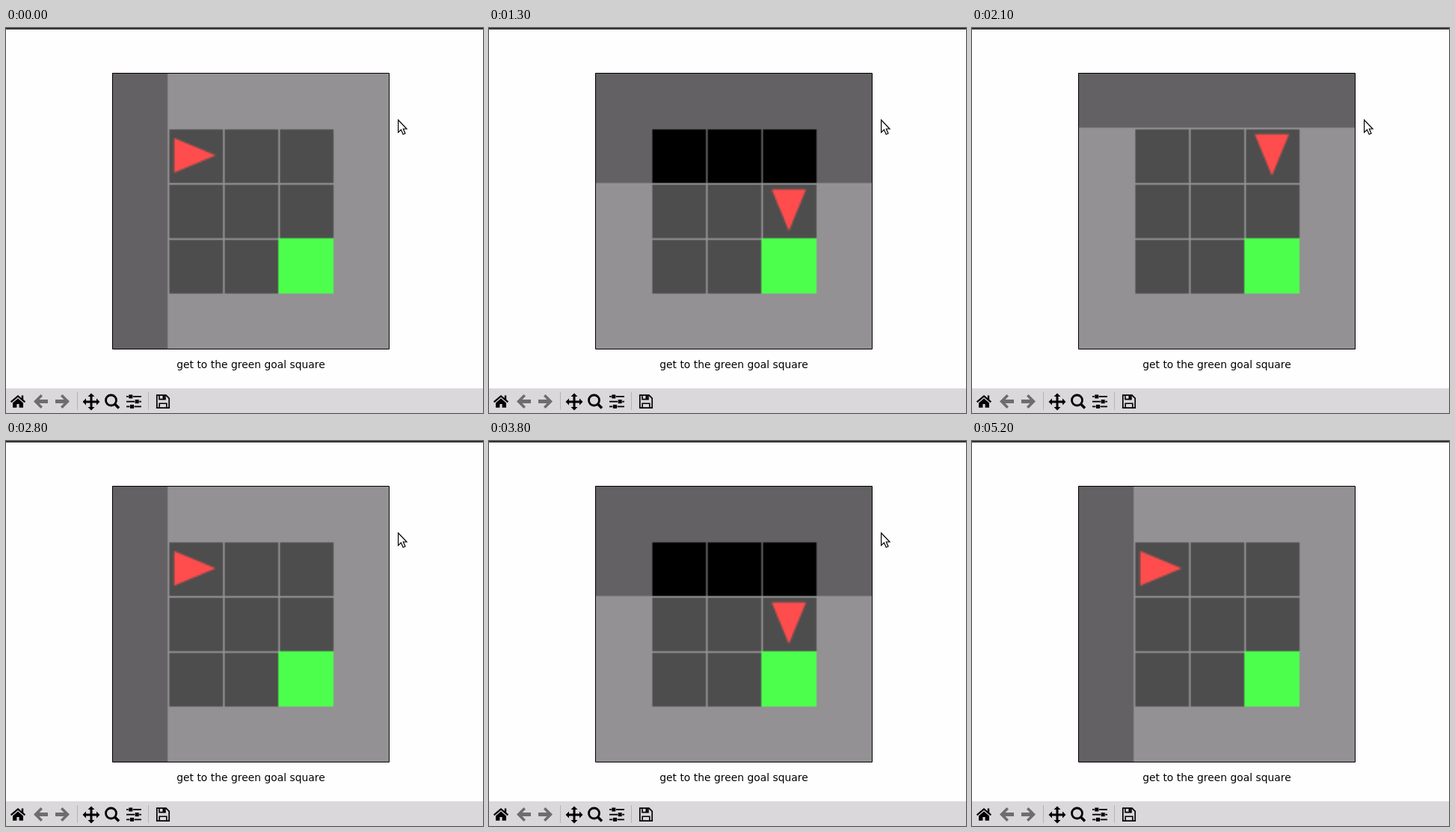
Write an HTML page with a canvas that moves like this. It is 638x515 px and loops after 5.6 s.

```html
<!DOCTYPE html>
<html lang="en">
<head>
<meta charset="utf-8">
<title>Grid world</title>
<style>
html, body { margin: 0; width: 100%; height: 100%; overflow: hidden; background: #fefefe; }
canvas { display: block; }
</style>
</head>
<body>
<canvas id="stage" width="638" height="515"></canvas>
<script>
const LOOP = 5600, TILE = 32, WORLD = 5 * TILE;
const stage = document.getElementById('stage').getContext('2d');
const world = newContext(WORLD);

// Start of each run, then the times of its actions: right, right, turn, forward
const runs = [
  [0, 400, 500, 800, 1300],
  [1500, 1800, 1800, 2100, 2500],
  [2800, 3100, 3300, 3500, 3800],
  [4500]
];

function newContext(size) {
  const c = document.createElement('canvas');
  c.width = c.height = size;
  return c.getContext('2d');
}

function rect(ctx, color, x, y, w, h) {
  ctx.fillStyle = color;
  ctx.fillRect(x, y, w, h);
}

const fill = (ctx, d, color = '#000') => {
  ctx.fillStyle = color;
  ctx.fill(new Path2D(d));
};

const line = (d, width) => {
  stage.strokeStyle = '#000';
  stage.lineWidth = width;
  stage.stroke(new Path2D(d));
};

function placed(ctx, x, y, paint) {
  ctx.save();
  ctx.translate(x, y);
  paint();
  ctx.restore();
}

function agentAt(t) {
  const run = runs.filter(r => r[0] <= t).pop();
  const done = run.filter(time => time <= t).length - 1;
  return { col: 1 + Math.min(done, 2), row: done > 3 ? 2 : 1, down: done > 2 };
}

// The world is painted small and scaled up, which softens its edges
function drawWorld({ col, row, down }) {
  rect(world, '#646164', 0, 0, WORLD, WORLD);
  for (let x = 1; x < 4; x++)
    for (let y = 1; y < 4; y++)
      rect(world, '#000', x * TILE + 1, y * TILE + 1, TILE - 1, TILE - 1);
  rect(world, '#0f0', 3 * TILE, 3 * TILE, TILE, TILE);

  placed(world, (col + .5) * TILE, (row + .5) * TILE, () => {
    if (down) world.rotate(Math.PI / 2);
    fill(world, 'M-12.2-9.9V9.9L11.8 0Z', '#f00');
  });

  // The agent sees everything from its own tile onward
  const x = down ? 0 : col * TILE, y = down ? row * TILE : 0;
  rect(world, 'rgba(255,255,255,.3)', x, y, WORLD - x, WORLD - y);

  stage.drawImage(world.canvas, 142.2, 59.4, 369.8, 369.6);
  rect(stage, '#fefefe', 142, 58, 371, 2);
  line('M142.5 60.5H512.5V429.5H142.5Z', 1);
}

const dots = newContext(2);
for (const i of [0, 1]) dots.fillRect(i, i, 1, 1);
const stipple = stage.createPattern(dots.canvas, 'repeat');

function drawToolbar() {
  const gray = '#dad8db';
  rect(stage, gray, 0, 482, 638, 33);
  for (const x of [95, 190]) rect(stage, '#b6b4b7', x, 487, 1, 24);

  // Home
  line('M6.6 500.4L16 492.4L25.4 500.4', 2.2);
  fill(stage, 'M20.8 491.5H23.2V498L20.8 496ZM9 501.5L16 495.6L23 501.5V507.8H17.6V503H14.4V507.8H9Z');

  // Back and forward, both disabled
  for (const side of [-1, 1])
    placed(stage, 61, 499.5, () => {
      stage.scale(side, 1);
      fill(stage, 'M24 0L14.5-9.5L12-7L16.5-2.5H5V2.5H16.5L12 7L14.5 9.5Z', stipple);
    });

  // Pan
  placed(stage, 114, 500, () => {
    for (let i = 0; i < 4; i++) {
      fill(stage, 'M-1.5 0V-7H-4.5L0-11.5L4.5-7H1.5V0Z');
      stage.rotate(Math.PI / 2);
    }
  });

  // Zoom
  line('M133.5 498a7 7 0 1 0 14 0a7 7 0 1 0-14 0', 2.8);
  line('M145.5 503L151 508.5', 3.6);

  // Sliders
  [164.3, 172.7, 166].forEach((knob, i) => {
    const y = 493 + i * 6.7;
    rect(stage, '#000', 161, y - .9, 20, 1.8);
    rect(stage, gray, knob - .5, y - 2.5, 6, 5);
    rect(stage, '#000', knob, y - 2.5, 5, 5);
  });

  // Save
  line('M202 491.2H214L218.2 495.4V508.2H201.8V491.2Z', 1.7);
  line('M205 491V496.6H213V491M205.2 508V502.2H214.8V508', 1.6);
  rect(stage, '#000', 209.5, 491, 2.5, 5);
}

// Rests, sweeps from the top right to the bottom left, then leaves
function drawPointer(t) {
  const step = Math.floor((t - 4900) / 100);
  if (step > 2) return;
  const [x, y] = step < 0 ? [524, 122] : [611 - 223.5 * step, 12 + 239 * step];
  placed(stage, x, y, () => {
    const arrow = 'M.6 1V17.6L4.4 14L7.2 20.2L10 19L7.3 13H12Z';
    fill(stage, arrow, '#fff');
    line(arrow, 1.2);
  });
}

function draw(t) {
  rect(stage, '#fefefe', 0, 0, 638, 515);
  rect(stage, '#353535', 0, 0, 638, 2);
  drawWorld(agentAt(t));
  stage.fillStyle = '#000';
  stage.font = '13.89px "DejaVu Sans", sans-serif';
  stage.textAlign = 'center';
  stage.fillText('get to the green goal square', 327.5, 455);
  drawToolbar();
  drawPointer(t);
}

const start = performance.now();
function tick() {
  draw((performance.now() - start) % LOOP);
  requestAnimationFrame(tick);
}
tick();
</script>
</body>
</html>
```
